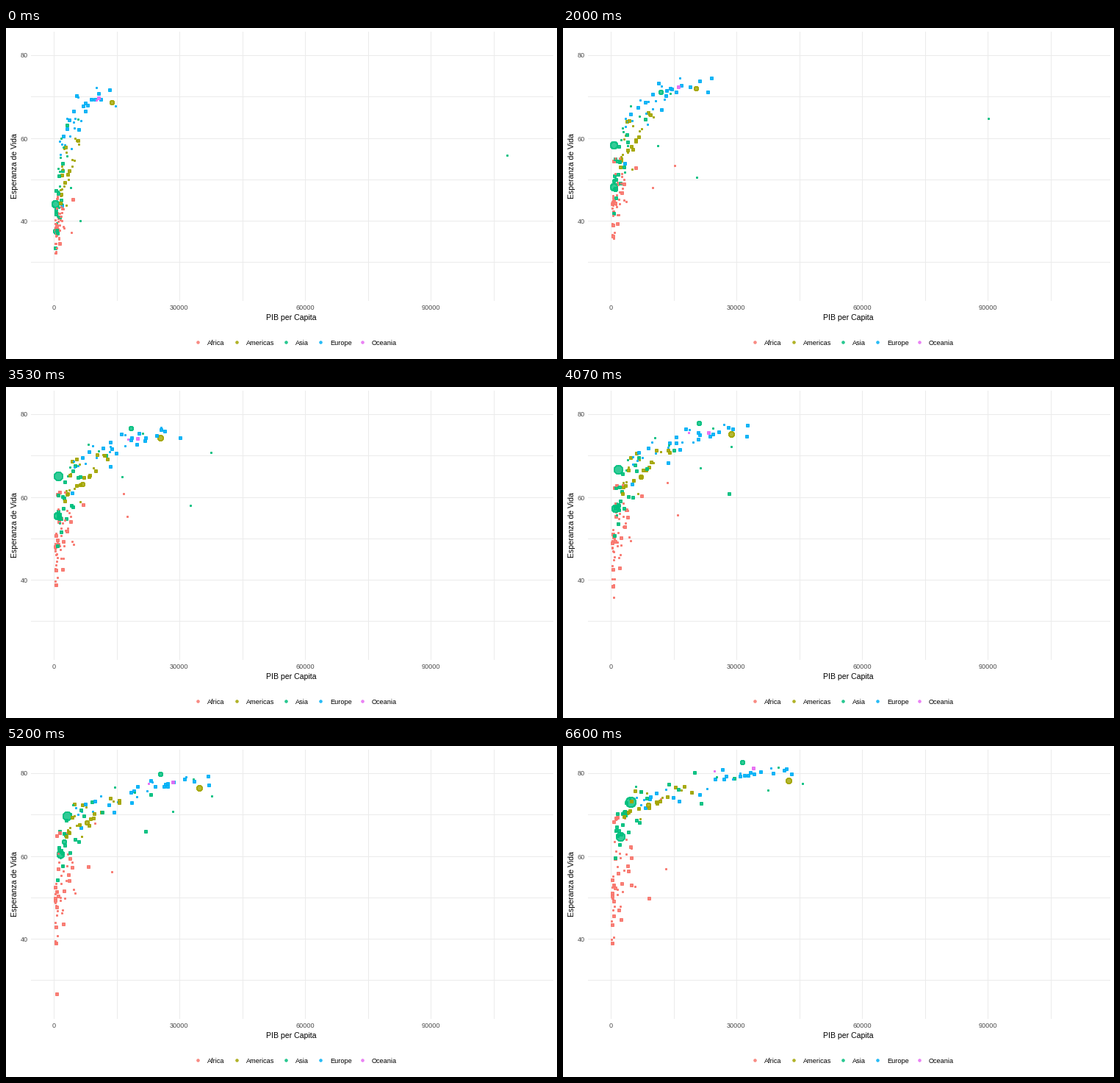
Write a matplotlib script that moves like this. It is 750 px wide and 450 px high and loops after 6.67 s.

```python
import numpy as np
import matplotlib.pyplot as plt
from matplotlib.animation import FuncAnimation

W, H, DPI = 750, 450, 100
PX = 72 / DPI
FRAMES, LOOP = 100, 6670
ALPHA = 0.8

plt.rcParams["font.family"] = ["Liberation Sans", "DejaVu Sans"]

COLORS = {
    "Africa": "#F8766D",
    "Americas": "#A3A500",
    "Asia": "#00BF7D",
    "Europe": "#00B0F6",
    "Oceania": "#E76BF3",
}
GROWTH = {"Africa": 3.6, "Americas": 2.6, "Asia": 2.6, "Europe": 1.25, "Oceania": 2.1}

# Large or far-out countries: starting population (millions), then evenly
# spaced way points of income (thousands) and of life expectancy.
LEADERS = [
    ("Asia", 556, [0.4, 1, 4.96], [44, 45.5, 61, 64.5, 67.5, 70.5, 73]),
    ("Asia", 372, [0.55, 0.85, 2.45], [37.4, 54.8, 64.7]),
    ("Asia", 82, [0.75, 1.4, 3.54], [37.5, 54, 70.7]),
    ("Asia", 86, [3.2, 17.9, 31.7], [63, 76.2, 82.6]),
    ("Asia", 4, [6.5, 17, 34, 22, 21.7], [39.9, 57, 72.8]),
    ("Asia", 0.16,
     [108.4, 113.5, 95.5, 80.9, 109.3, 59.3, 31.4, 28.1, 34.9, 40.3, 35.1, 47.3],
     [55.6, 70.3, 77.6]),
    ("Americas", 157, [13.99, 24.6, 42.95], [68.4, 74, 78.2]),
    ("Americas", 56.6, [2.11, 6.85, 9.07], [50.9, 62.4, 72.4]),
    ("Europe", 69, [7.14, 21.3, 32.2], [67.5, 73.1, 79.4]),
    ("Europe", 50, [9.98, 17.8, 33.2], [69.2, 73.4, 79.4]),
    ("Europe", 22, [1.97, 4.25, 8.46], [43.6, 60.3, 71.8]),
    ("Africa", 1, [2.4, 9, 21.3, 14, 9.5, 12.1], [42.7, 60, 74]),
    ("Africa", 0.42, [4.3, 7.9, 18, 14, 13.2], [37, 55, 56.7]),
    ("Africa", 14, [4.7, 9.3], [45, 53.4, 61.2, 49.3]),
    ("Africa", 2.5, [0.5, 0.86], [40, 43.5, 45.5, 24, 46.2]),
]

# Everyone else follows a regional trend: count, typical population,
# income and its log spread, life expectancy and its spread.
REGIONS = [
    ("Africa", 48, 2.5, [1, 1.4, 1.4], [0.55, 0.9], [38.8, 49.5, 54], [4, 9]),
    ("Americas", 23, 4, [3.1, 6, 8], [0.42, 0.55], [53, 65, 73.5], [6.5, 3]),
    ("Asia", 7, 3, [2.4, 9.5, 25], [0.5, 0.35], [54, 68, 78], [6, 2]),
    ("Asia", 20, 8, [1.1, 2.2, 3], [0.5, 0.65], [44, 57, 68], [6.5, 5]),
    ("Europe", 15, 8, [7.5, 18.5, 33], [0.4, 0.18], [68.2, 74, 80], [2.5, 0.8]),
    ("Europe", 12, 5, [3.2, 8.8, 12], [0.45, 0.4], [61.5, 70, 74.8], [3.5, 1.4]),
    ("Oceania", 2, 4, [10.3, 17.9, 29.4], [0.02, 0.1], [69.2, 73.5, 80.7], [0.2, 0.4]),
]

rng = np.random.default_rng(52)


def track(pts):
    t = np.linspace(0, 1, FRAMES)
    return np.interp(t, np.linspace(0, 1, len(pts)), pts)


def wobble(size):
    return track(rng.normal(0, size, 12))


def region(name, n, pop, income, gap, life, spread):
    """Countries spread around a common trend, richer ones living longer."""
    rows = []
    for luck in np.linspace(-1.6, 1.6, n):
        health = np.clip(0.6 * luck + 0.75 * rng.normal(), -1.7, 1.7)
        gdp = track(income) * np.exp(track(gap) * luck + wobble(0.05))
        age = track(life) + track(spread) * health + wobble(0.25)
        rows.append((name, pop * np.exp(rng.normal(0, 0.7)), gdp, age))
    return rows


def sx(gdp):
    return 64.9 + gdp * 5.7


def sy(life):
    return 36.7 + (80 - life) * 5.62


def radius(pop):
    return np.round(1.09 * (1 + 5 * np.sqrt(pop / 1319)))


def dot_area(r):
    return ((2 * r - 0.5) * PX) ** 2


rows = [(name, pop, track(g), track(a)) for name, pop, g, a in LEADERS]
for spec in REGIONS:
    rows += region(*spec)
rows = [rows[i] for i in rng.permutation(len(rows))]
xs = np.floor(sx(np.array([r[2] for r in rows]))) + 0.5
ys = np.floor(sy(np.array([r[3] for r in rows]))) + 0.5
areas = dot_area(radius(np.array([track([r[1], r[1] * GROWTH[r[0]]]) for r in rows])))

fig = plt.figure(figsize=(W / DPI, H / DPI), dpi=DPI, facecolor="white")
ax = fig.add_axes([0, 0, 1, 1])
ax.set(xlim=(0, W), ylim=(H, 0))
ax.axis("off")


def label(x, y, s, size=9.2, color="black", **kw):
    ax.text(x, y, s, fontsize=size * PX, color=color, **kw)


def dots(x, y, s, colors, z):
    return ax.scatter(x, y, s=s, c=colors, alpha=ALPHA, linewidths=PX,
                      antialiased=False, zorder=z)


# grid and axes
grid = dict(color="#EBEBEB", lw=PX, antialiased=False, zorder=1)
for k in range(8):
    x = np.floor(sx(15 * k)) + 0.5
    ax.plot([x, x], [5, 370], **grid)
    if k % 2 == 0:
        label(sx(15 * k), 383, str(15000 * k), color="#4D4D4D", ha="center")
for life in range(30, 81, 10):
    y = np.floor(sy(life)) + 0.5
    ax.plot([34, 744], [y, y], **grid)
    if life % 20 == 0:
        label(29.5, y + 4, str(life), color="#4D4D4D", ha="right")
label(388.7, 397, "PIB per Capita", 10.5, ha="center")
label(12, 187.5, "Esperanza de Vida", 10.5, rotation=90, ha="center", va="center")

# legend
for name, x in zip(COLORS, (260, 313, 380, 427, 484)):
    dots([x + 0.5], [426.5], dot_area(2), [COLORS[name]], 2)
    label(x + 14, 431, name)

points = dots(xs[:, 0], ys[:, 0], areas[:, 0], [COLORS[r[0]] for r in rows], 3)


def update(i):
    points.set_offsets(np.column_stack([xs[:, i], ys[:, i]]))
    points.set_sizes(areas[:, i])
    return (points,)


anim = FuncAnimation(fig, update, frames=FRAMES, interval=LOOP / FRAMES, repeat=True)
plt.show()
```
